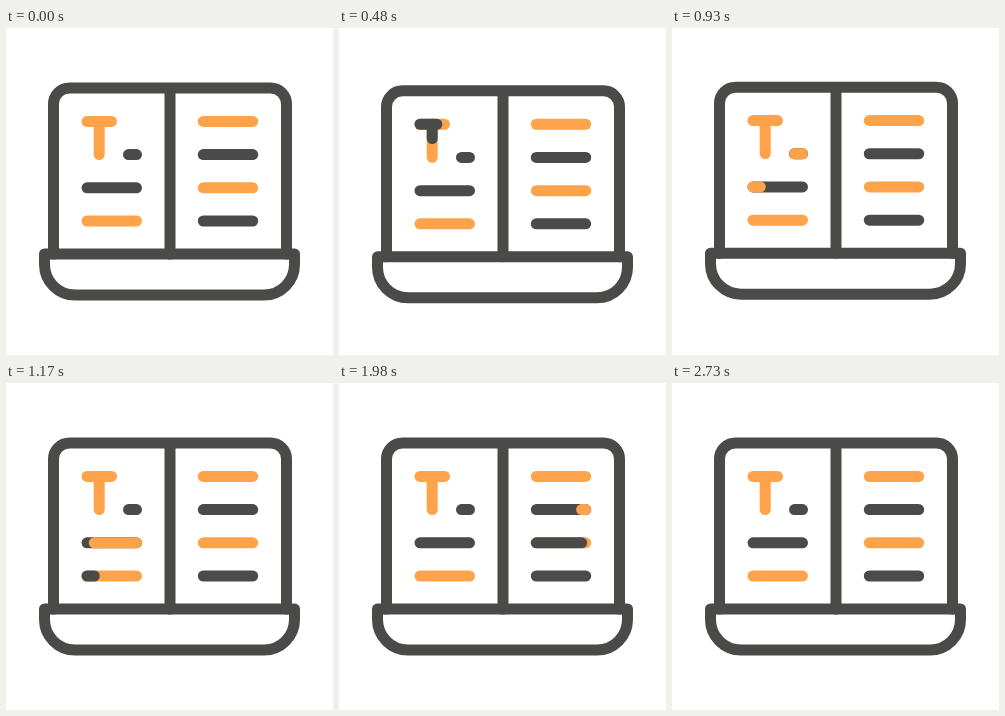
Animation, 327 px wide and 327 px high, one loop 3 s. Source, as an HTML page:

```html
<!DOCTYPE html>
<html lang="en">
<head>
<meta charset="utf-8">
<title>Laptop book</title>
<style>
  html, body { margin: 0; width: 100%; height: 100%; overflow: hidden; background: #fff; }
  svg { display: block; width: 100%; height: 100%; }
</style>
</head>
<body>
<svg viewBox="0 0 327 327" fill="none" stroke="#4a4a49" stroke-width="11" stroke-linecap="round" stroke-linejoin="round">
  <g id="device">
    <path d="M47.5 226V76a16 16 0 0 1 16-16H264.500a16 16 0 0 1 16 16V226M164 60V226"/>
    <path d="M38.500 226H288.500V236.500a30.500 30.500 0 0 1-30.500 30.500H69a30.500 30.500 0 0 1-30.500-30.500Z"/>
    <g id="rows"></g>
    <g id="letter"></g>
  </g>
</svg>
<script>
const LOOP = 3000, STAGE = 240;
const DARK = '#4a4a49', ORANGE = '#ffa34a';
const byId = id => document.getElementById(id);
const device = byId('device'), rows = byId('rows'), letter = byId('letter');

// cubic-bezier(.7, 0, .3, 1), solved by bisection
function ease(x) {
  if (x <= 0) return 0;
  if (x >= 1) return 1;
  let lo = 0, hi = 1, u = 0.5;
  for (let i = 0; i < 24; i++) {
    u = (lo + hi) / 2;
    const v = 1 - u;
    if (2.1 * v * v * u + 0.9 * v * u * u + u * u * u < x) lo = u; else hi = u;
  }
  return u * u * (3 - 2 * u);
}

const tween = (t, from, length) => ease((t - from) / length);

// Down, up, and back to rest
function bounce(t, from, length, size) {
  const q = length / 4;
  return size * (tween(t, from, q) - 2 * tween(t, from + q, 2 * q) + tween(t, from + 3 * q, q));
}

function addLine(parent, color) {
  const line = document.createElementNS('http://www.w3.org/2000/svg', 'line');
  line.setAttribute('stroke', color);
  parent.appendChild(line);
  return line;
}

function place(line, [x1, y1, x2, y2], a, b) {
  const set = (name, value) => line.setAttribute(name, value);
  set('x1', x1 + (x2 - x1) * a);
  set('y1', y1 + (y2 - y1) * a);
  set('x2', x1 + (x2 - x1) * b);
  set('y2', y1 + (y2 - y1) * b);
}

// A stroke and the sweep that swaps its colour from time `start`
function stroke(parent, color, start, ends) {
  place(addLine(parent, color), ends, 0, 1);
  return { parent, ends, start, color: color === DARK ? ORANGE : DARK };
}

const rowY = i => 93.4 + 33.2 * i;
const left = (i, x = 81) => [x, rowY(i), 130.5, rowY(i)];
const right = i => [197.3, rowY(i), 246.7, rowY(i)];

const strokes = [
  stroke(letter, ORANGE, 346, [81, 93.4, 105.5, 93.4]),
  stroke(letter, ORANGE, 366, [93.2, 93.4, 93.2, 126.5]),
  stroke(rows, DARK, 652, left(1, 122.5)),
  stroke(rows, DARK, 848, left(2)),
  stroke(rows, ORANGE, 1088, left(3)),
  ...[0, 1, 2, 3].map(i => stroke(rows, i % 2 ? DARK : ORANGE, 1328 + STAGE * i, right(i)))
];
for (const s of strokes) s.sweep = addLine(s.parent, s.color);

function draw(t) {
  device.setAttribute('transform', `translate(0 ${bounce(t, 0, 990, 15.5)})`);
  letter.setAttribute('transform', `translate(0 ${bounce(t, 1990, 740, 10)})`);
  for (const { sweep, ends, start } of strokes) {
    const head = tween(t, start, STAGE), tail = tween(t, start + STAGE, STAGE);
    sweep.style.display = head > tail ? '' : 'none';
    place(sweep, ends, tail, head);
  }
}

function tick() {
  draw(performance.now() % LOOP);
  requestAnimationFrame(tick);
}
tick();
</script>
</body>
</html>
```
